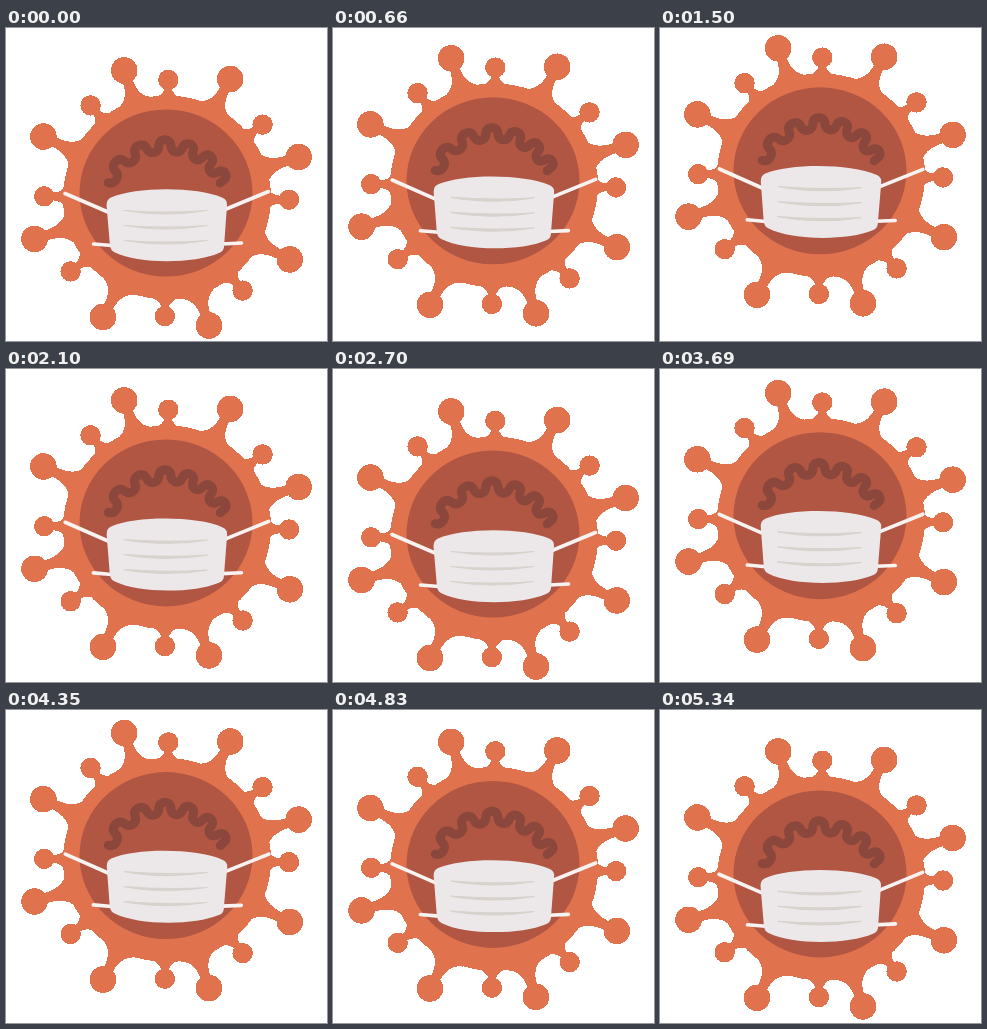
An HTML page for the animation above (5370 ms loop, 321 px wide and 313 px high).

```html
<!DOCTYPE html>
<html lang="en">
<head>
<meta charset="utf-8">
<title>Masked virus</title>
<style>
  html, body { margin: 0; width: 100%; height: 100%; overflow: hidden; background: #fff; }
  svg { display: block; width: 321px; height: 313px; }
</style>
</head>
<body>
<svg viewBox="0 0 321 313">
  <g id="virus">
    <g fill="#e0734e" shape-rendering="crispEdges">
      <g id="spikes"></g>
      <ellipse cx="161" cy="169.5" rx="104" ry="102"/>
    </g>
    <ellipse cx="160" cy="165" rx="86.5" ry="83.5" fill="#b15643"/>
    <path id="brow" fill="none" stroke="#8b473b" stroke-width="9" stroke-linecap="round" stroke-linejoin="round"/>
    <g id="mask">
      <path d="M59 165.500L102 184M262.500 163.500L219 181.500M87.500 216L106 217.500M235.500 215L216 216"
        fill="none" stroke="#f8f2f1" stroke-width="3.600" stroke-linecap="round"/>
      <path d="M100.500 177Q100.500 171.500 105 169.500C130 158.500 191 158.500 216 169.500Q221.500 171.500 221 177L218 219Q217.500 223.500 213 225C188 236 132 236 109 224.500Q105 223 104 218Z" fill="#ece8e9"/>
      <g id="folds" fill="#d8d2cd" stroke="#d8d2cd" stroke-width="1.200" stroke-linejoin="round"></g>
    </g>
  </g>
</svg>
<script>
const LOOP = 5370, STEP = 30, HALF = 1350, RISE = 25;
const CENTER = { x: 160.6, y: 170 };
const QUARTER = [-17.8, 0.8, 27.3, 51.6];   // knob angles, repeated every 90 degrees
const get = id => document.getElementById(id);

// Point at an angle clockwise from straight up.
function polar(origin, deg, r, stretchX = 1, stretchY = 1) {
  const a = deg * Math.PI / 180;
  return { x: origin.x + r * Math.sin(a) * stretchX, y: origin.y - r * Math.cos(a) * stretchY };
}

function spike(deg, big) {
  const [reach, r, neck, base] = big ? [136.3, 13.3, 5, 19] : [120.3, 10.2, 3.8, 12];
  const { x, y } = polar(CENTER, deg, reach, 1.0175, 0.9825);
  const dx = x - CENTER.x, dy = y - CENTER.y, len = Math.hypot(dx, dy);
  const at = (dist, side) => [
    CENTER.x + (dx * dist - dy * side) / len,
    CENTER.y + (dy * dist + dx * side) / len
  ].map(v => v.toFixed(2)).join(" ");
  const top = len - r + 2;
  return `<path d="M${at(97, -base)}L${at(100, -base)}Q${at(105, -neck)} ${at(top, -neck)}` +
    `L${at(len, 0)}L${at(top, neck)}Q${at(105, neck)} ${at(100, base)}L${at(97, base)}Z"/>` +
    `<circle cx="${x}" cy="${y}" r="${r}"/>`;
}

// Wave wound around an arc; n counts waves and the waves tighten to the right.
function browPath() {
  const points = [];
  for (let n = -2.75; n <= 3.35; n += 0.05) {
    const m = n + 0.055 * Math.sin(4 * Math.PI * n);
    const p = polar({ x: 160, y: 181 }, -1 + 21.8 * m - 0.6 * m * m, 63.5 + 5.7 * Math.cos(2 * Math.PI * n));
    points.push(`${p.x.toFixed(2)} ${p.y.toFixed(2)}`);
  }
  return "M" + points.join("L");
}

const fold = y => `<path d="M118 ${y}Q160 ${y + 3} 201 ${y}Q160 ${y + 7} 118 ${y}Z"/>`;

get("spikes").innerHTML = [0, 90, 180, 270]
  .flatMap(turn => QUARTER.map((deg, i) => spike(turn + deg, i % 2 === 0))).join("");
get("brow").setAttribute("d", browPath());
get("folds").innerHTML = [0, 1, 2].map(i => fold(182.5 + 15 * i)).join("");

function draw() {
  const t = Math.floor(performance.now() % LOOP / STEP) * STEP;
  const lift = RISE * (1 - Math.abs(t % (2 * HALF) - HALF) / HALF);
  get("virus").setAttribute("transform", `translate(0 ${-lift})`);
  // The mask rides up and tilts slightly with the bob.
  get("mask").setAttribute("transform", `translate(0 ${-0.05 * lift}) rotate(${0.03 * lift} 160 198)`);
  requestAnimationFrame(draw);
}
draw();
</script>
</body>
</html>
```
